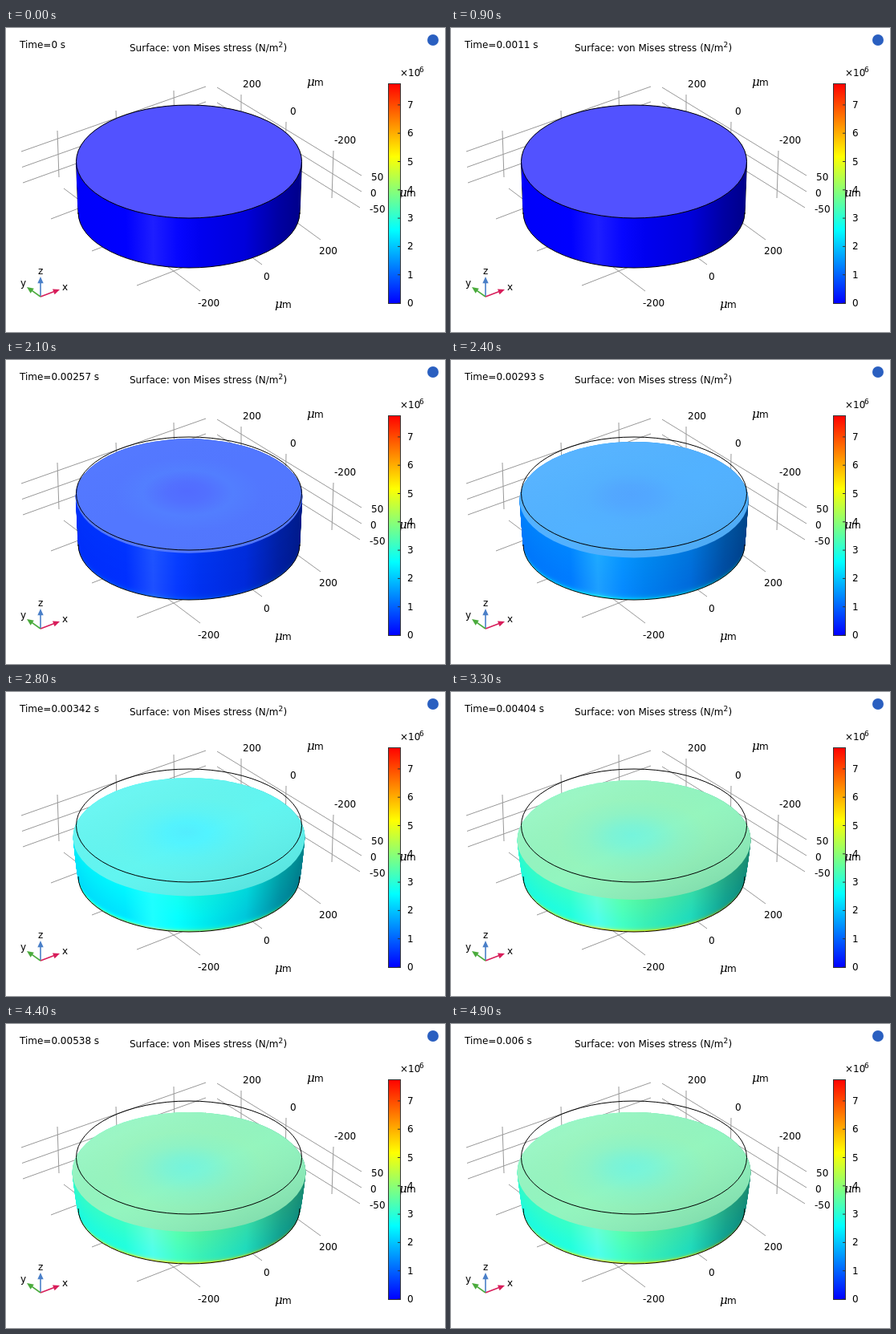
Write an HTML page with a canvas that moves like this. It is 547 by 379 pixels and loops after 5000 ms.

```html
<!DOCTYPE html>
<html lang="en">
<head>
<meta charset="utf-8">
<title>Cylinder stress</title>
<style>
html, body { margin: 0; width: 100%; height: 100%; overflow: hidden; background: #fff; }
canvas { display: block; width: 547px; height: 379px; }
</style>
</head>
<body>
<canvas id="stage" width="547" height="379"></canvas>
<script>
const ctx = document.getElementById('stage').getContext('2d');
const FONT = '12px "DejaVu Sans", sans-serif';
const CX = 228, STEPS = 50, STEP_MS = 100;

const clamp = (x, lo = 0, hi = 1) => Math.min(hi, Math.max(lo, x));
const mix = (a, b, k) => a + (b - a) * k;
const rgb = c => `rgb(${c.map(x => Math.round(clamp(x, 0, 255))).join(',')})`;

// Rainbow: blue, cyan, yellow, red
function rainbow(v) {
  const k = clamp(v) * 3;
  return [clamp(k - 1), Math.min(clamp(k), clamp(3 - k)), clamp(2 - k)].map(x => x * 255);
}

function line(x1, y1, x2, y2, color = '#999', width = 1) {
  ctx.strokeStyle = color;
  ctx.lineWidth = width;
  ctx.beginPath();
  ctx.moveTo(x1, y1);
  ctx.lineTo(x2, y2);
  ctx.stroke();
}

function text(str, x, y, font = FONT) {
  ctx.font = font;
  ctx.fillStyle = '#000';
  ctx.fillText(str, x, y);
}

function micron(x, y) {
  text('μ', x, y, 'italic 15px "DejaVu Serif", "Noto Serif", serif');
  text('m', x + 9, y);
}

function ellipse(cy, rx, ry, from = 0, to = Math.PI * 2) {
  ctx.beginPath();
  ctx.ellipse(CX, cy, rx, ry, 0, from, to);
}

const GRID = [
  [19, 154, 249, 73], [20, 173.5, 249, 92], [21, 193, 249, 111],
  [263, 74, 443, 184], [263, 93, 443, 204], [263, 113, 441, 224],
  [64, 128, 66, 186], [137, 103, 139, 160], [209, 78, 210, 132],
  [293, 83, 293, 138], [349, 117, 348, 174], [408, 153, 406, 212],
  [72, 200, 242, 328], [150, 170, 319, 295], [223, 141, 392, 264],
  [56, 238, 245, 166], [107, 278, 300, 204], [163, 321, 362, 243]
];
const LABELS = [
  ['200', 295, 74], ['0', 354, 108], ['-200', 409, 144],
  ['50', 455, 190], ['0', 454, 210], ['-50', 453, 230],
  ['200', 390, 282], ['0', 321, 314], ['-200', 239, 347],
  ['z', 40, 307], ['y', 18, 322], ['x', 70, 327]
];
// Wall lighting across its width: position, factor, highlight
const SHADE = [
  [0, .98, 0], [.22, 1, 0], [.34, 1, 30], [.45, .98, 6],
  [.55, .94, 0], [.75, .86, 0], [.9, .64, 0], [1, .54, 0]
];

function arrow(x, y, color) {
  const a = Math.atan2(y - 335, x - 43);
  line(43, 335, x - 6 * Math.cos(a), y - 6 * Math.sin(a), color, 1.6);
  ctx.fillStyle = color;
  ctx.beginPath();
  ctx.moveTo(x, y);
  for (const s of [-1, 1]) {
    ctx.lineTo(x - 9 * Math.cos(a + s * .42), y - 9 * Math.sin(a + s * .42));
  }
  ctx.fill();
}

function colorBar() {
  const grad = ctx.createLinearGradient(0, 343, 0, 69);
  for (let i = 0; i <= 3; i++) grad.addColorStop(i / 3, rgb(rainbow(i / 3)));
  ctx.fillStyle = grad;
  ctx.fillRect(476, 69, 15, 274);
  ctx.strokeStyle = '#333';
  ctx.lineWidth = 1;
  ctx.strokeRect(476.5, 69.5, 15, 274);
  for (let i = 0; i <= 7; i++) {
    const y = 343 - i * 35.3;
    line(488, y, 491, y, '#333');
    text(i, 500, y + 4);
  }
  text('×10', 491, 60);
  text('6', 515, 55, '9px "DejaVu Sans", sans-serif');
}

function wall(load) {
  const N = 60;
  for (let i = 0; i <= N; i++) {
    const s = i / N;
    const rx = mix(138, 140.5, s) + 5 * load * s ** .6;
    const ry = mix(69, 70.5, s) + 4 * load * s;
    const cy = mix(230, 166.5 + 18 * load, s);
    const grad = ctx.createLinearGradient(CX - rx, 0, CX + rx, 0);
    for (const [p, factor, glow] of SHADE) {
      const stress = .36 + .04 * s + .045 * Math.sin(p * Math.PI) ** 4 + .3 * Math.exp(-s * 24);
      grad.addColorStop(p, rgb(rainbow(stress * load).map(c => c * factor + glow)));
    }
    ctx.fillStyle = grad;
    ellipse(cy, rx, ry);
    ctx.fill();
  }
}

function topFace(load, step) {
  const cy = 166.5 + 18 * load, rx = 140.5 + 5 * load, ry = 70.5 + 4 * load;
  const ring = .016 * Math.exp(-(((step - 21) / 2) ** 2));
  const lit = v => {
    const [r, g, b] = rainbow(v);
    return rgb([82 + .69 * r, 82 + .64 * g, 80 + .69 * b]);
  };
  ctx.save();
  ctx.translate(CX, cy);
  ctx.scale(1, ry / rx);
  const core = ctx.createRadialGradient(-3, -12, 0, 0, 0, rx);
  core.addColorStop(0, lit(.4 * load - ring));
  core.addColorStop(.18, lit(.415 * load - ring / 2));
  core.addColorStop(.4, lit(.445 * load + ring));
  core.addColorStop(.65, lit(.46 * load));
  core.addColorStop(1, lit(.455 * load));
  ctx.beginPath();
  ctx.arc(0, 0, rx, 0, Math.PI * 2);
  ctx.fillStyle = core;
  ctx.fill();
  const tilt = ctx.createLinearGradient(-90, -90, 90, 110);
  tilt.addColorStop(0, `rgba(255,255,255,${.08 * load})`);
  tilt.addColorStop(.5, 'rgba(128,128,128,0)');
  tilt.addColorStop(1, `rgba(0,40,30,${.1 * load})`);
  ctx.fillStyle = tilt;
  ctx.fill();
  ctx.restore();
}

// Three significant digits, cut off rather than rounded
function timeLabel(step) {
  const t = step * .006 / (STEPS - 1);
  if (!t) return '0';
  const exp = Math.floor(Math.log10(t));
  const digits = Math.floor(t * 10 ** (2 - exp) + 1e-6) / 100;
  return exp < -3 ? `${digits}E${exp}` : String(+(digits * 10 ** exp).toFixed(5));
}

function draw(step) {
  const k = clamp((step - 17) / 15.5);
  const load = k * k * (3 - 2 * k);

  ctx.fillStyle = '#fff';
  ctx.fillRect(0, 0, 547, 379);
  for (const g of GRID) line(...g);
  line(87.5, 167, 90, 232, '#000');
  line(368.5, 167, 366, 232, '#000');

  wall(load);
  topFace(load, step);
  ctx.strokeStyle = '#000';
  ctx.lineWidth = 1;
  ellipse(230, 138, 69, 0, Math.PI);
  ctx.stroke();
  ellipse(166.5, 140.5, 70.5);
  ctx.stroke();

  for (const l of LABELS) text(...l);
  micron(375, 72);
  micron(335, 349);
  micron(490, 210);
  colorBar();
  arrow(43, 310, '#4a7fc8');
  arrow(67, 326, '#d81e5b');
  arrow(26, 323, '#4aab3c');

  text(`Time=${timeLabel(step)} s`, 17, 25);
  text('Surface: von Mises stress (N/m', 154, 29);
  const end = 154 + ctx.measureText('Surface: von Mises stress (N/m').width;
  text('2', end, 24, '9px "DejaVu Sans", sans-serif');
  text(')', end + 6, 29);

  ctx.fillStyle = '#2a5fc0';
  ctx.beginPath();
  ctx.arc(532, 15, 7, 0, Math.PI * 2);
  ctx.fill();
}

let shown = -1;
const start = performance.now();
function tick() {
  const step = Math.floor((performance.now() - start) / STEP_MS) % STEPS;
  if (step !== shown) draw(shown = step);
  requestAnimationFrame(tick);
}
tick();
</script>
</body>
</html>
```
